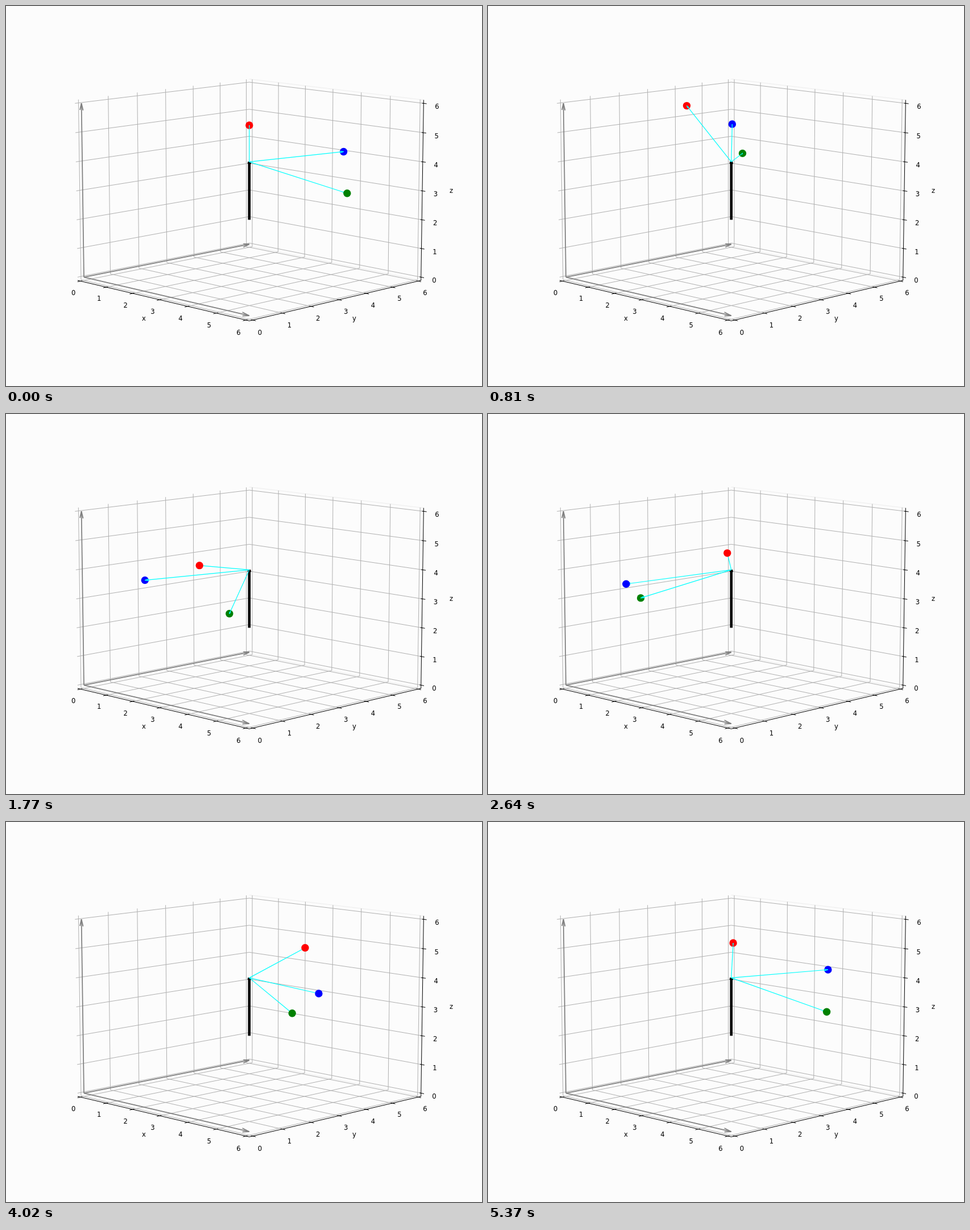
An HTML page with a canvas that plays this animation: 837x669 px, repeating every 5.4 s.

```html
<!DOCTYPE html>
<html lang="en">
<head>
<meta charset="utf-8">
<title>Rotating vectors</title>
<style>
  html, body { margin: 0; width: 100%; height: 100%; overflow: hidden; background: #fcfcfc; }
  canvas { display: block; }
</style>
</head>
<body>
<canvas id="stage" width="837" height="669"></canvas>
<script>
const ctx = document.getElementById('stage').getContext('2d');
const LOOP = 5400, STEP = 30;
const LO = -0.115, HI = 6.115;
const ELEV = Math.PI / 18, SIN = Math.sin(ELEV), COS = Math.cos(ELEV);
const HUB = [3, 3, 4];

// Perspective camera at azimuth -45 degrees, elevation 10 degrees.
function depth([x, y, z]) {
  return (x - y) / Math.SQRT2 * 0.1905 * COS + (z - 3) * 0.14285 * SIN;
}
function project(p) {
  const [x, y, z] = p;
  const right = (x + y - 6) / Math.SQRT2 * 0.1905;
  const up = (z - 3) * 0.14285 * COS - (x - y) / Math.SQRT2 * 0.1905 * SIN;
  const scale = 362.5 / (1 - depth(p) / 10);
  return [427.8 + right * scale, 325.5 - up * scale];
}

function line(points, color, width) {
  ctx.strokeStyle = color;
  ctx.lineWidth = width;
  ctx.beginPath();
  for (const p of points) ctx.lineTo(...project(p));
  ctx.stroke();
}

// Arrow whose two barbs are turned 15 degrees in the plane upright to it.
function arrow(from, to, color, width, ratio = 0.04) {
  const v = to.map((c, i) => c - from[i]);
  const flat = Math.hypot(v[0], v[1]);
  const [ax, ay] = flat > 1e-9 ? [v[1] / flat, -v[0] / flat] : [0, 1];
  const side = [ay * v[2], -ax * v[2], ax * v[1] - ay * v[0]];
  const barb = sign => to.map((c, i) =>
    c - ratio * (v[i] * Math.cos(Math.PI / 12) + sign * side[i] * Math.sin(Math.PI / 12)));
  line([from, to], color, width);
  line([barb(1), to], color, width);
  line([barb(-1), to], color, width);
}

function text(str, x, y) {
  ctx.fillStyle = '#000';
  ctx.fillText(str, x, y + 4.2);
}
function tickLabel(n, p) {
  const [x, y] = project(p);
  text(n, x, y + 5.4);
}

function drawAxes() {
  const grid = '#b0b0b0';
  line([[LO, HI, HI], [HI, HI, HI]], '#ededed', 1);
  line([[LO, HI, LO], [HI, HI, LO]], '#ededed', 1);
  for (let n = 0; n <= 6; n++) {
    line([[n, LO, LO], [n, HI, LO], [n, HI, HI]], grid, 1);
    line([[HI, n, LO], [LO, n, LO], [LO, n, HI]], grid, 1);
    line([[HI, HI, n], [LO, HI, n], [LO, LO, n]], grid, 1);
  }
  line([[LO, LO, LO], [HI, LO, LO], [HI, HI, LO]], '#000', 1);
  line([[HI, HI, LO], [HI, HI, HI]], '#000', 1);

  const out = 0.1, inn = 0.05, gap = 0.24;
  for (let n = 0; n <= 6; n++) {
    line([[n, LO - out, LO], [n, LO + inn, LO]], '#000', 1);
    line([[HI + out, n, LO], [HI - inn, n, LO]], '#000', 1);
    line([[HI + out, HI, n], [HI - inn, HI, n]], '#000', 1);
    tickLabel(n, [n, LO - gap, LO - gap]);
    tickLabel(n, [HI + gap, n, LO - gap]);
    tickLabel(n, [HI + gap, HI + gap, n]);
  }
  text('x', 242.5, 549.5);
  text('y', 612.5, 549.5);
  text('z', 783, 324.5);
}

function dot(p, color) {
  ctx.fillStyle = color;
  ctx.beginPath();
  ctx.arc(...project(p), 6.7, 0, 2 * Math.PI);
  ctx.fill();
}

// Tips in a frame that turns by a around the hub while they bob twice per turn.
function tips(a) {
  const s = Math.sin(2 * a), c = Math.cos(2 * a);
  return [
    ['#f00', -1, 1, 0.98 + 0.83 * s],
    ['#00f', 0.5, 3, -0.02 + 0.77 * s],
    ['#008000', 1 + c, 1.5 + s, -1 + 0.8 * s]
  ].map(([color, x, y, z]) => [color, [
    HUB[0] + x * Math.cos(a) - y * Math.sin(a),
    HUB[1] + x * Math.sin(a) + y * Math.cos(a),
    HUB[2] + z
  ]]);
}

function draw(ms) {
  const a = Math.floor(ms % LOOP / STEP) * STEP / LOOP * 2 * Math.PI;
  ctx.fillStyle = '#fcfcfc';
  ctx.fillRect(0, 0, 837, 669);
  ctx.font = '11.6px "DejaVu Sans", sans-serif';
  ctx.textAlign = 'center';
  drawAxes();
  for (const end of [[6, 0, 0], [0, 6, 0], [0, 0, 6]]) arrow([0, 0, 0], end, '#808080', 1.75);
  arrow([3, 3, 2], HUB, '#000', 4.65);

  for (const [color, p] of tips(a)) {
    const far = depth(p) < depth(HUB);
    if (far) dot(p, color);
    arrow(HUB, p, '#0ff', 1.2);
    if (!far) dot(p, color);
  }
}

const start = performance.now();
function tick() {
  draw(performance.now() - start);
  requestAnimationFrame(tick);
}
tick();
</script>
</body>
</html>
```
